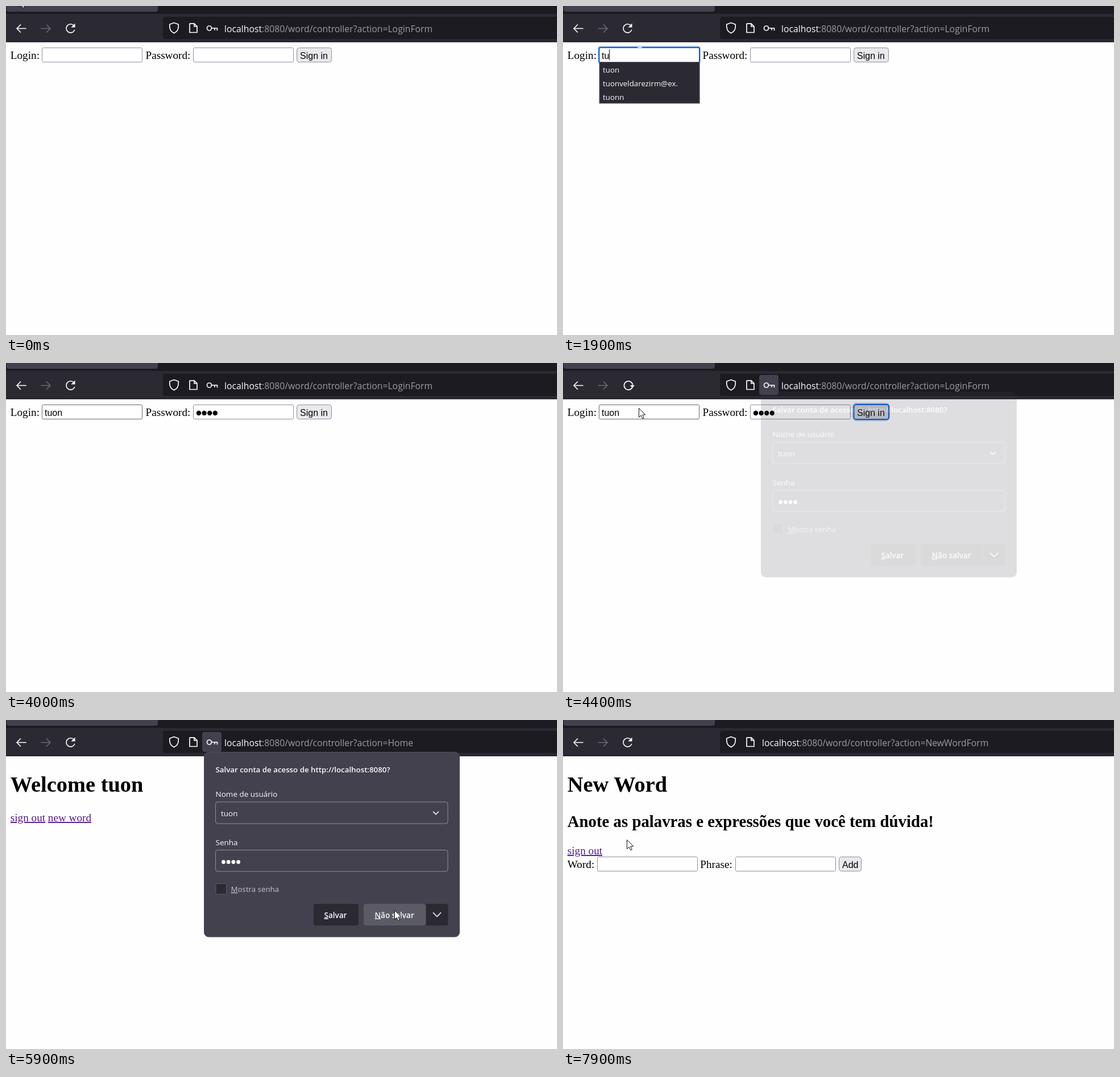
An HTML page for the animation above (8000 ms loop, 969 by 578 pixels).

```html
<!DOCTYPE html>
<html lang="pt">
<head>
<meta charset="utf-8">
<title>Word notes login</title>
<style>
html, body { margin: 0; width: 100%; height: 100%; overflow: hidden; background: #fefefe; }
svg { display: block; width: 969px; height: 578px; }
text { white-space: pre; }
.ui { font-family: "Open Sans", "Noto Sans", sans-serif; font-size: 13.5px; fill: #fbfbfe; }
.semi { font-weight: 600; }
.url { font-size: 15.78px; fill: #9c9ba3; }
.serif { font-family: "Liberation Serif", serif; font-size: 19.2px; }
.h1 { font-size: 38.4px; font-weight: bold; }
.h2 { font-size: 28.8px; font-weight: bold; }
.form { font-family: "Liberation Sans", sans-serif; font-size: 16px; }
.link { fill: #551a8b; text-decoration: underline; }
.active { fill: #ee0000; }
.key { text-decoration: underline; }
.icon { fill: none; stroke: #fbfbfe; stroke-width: 1.7; stroke-linecap: round; stroke-linejoin: round; }
</style>
</head>
<body>
<svg id="stage" viewBox="0 0 969 578"></svg>
<script>
const LOOP = 8000, STEP = 100;
const USER = "tuon";
const SUGGESTIONS = [USER, "00000000000", "tuonveldarezirm@ex.", "000.000.000-00", "tebo", "tuonn"];
const CARETS = [0, 4.4, 13.3, 22.2, 31.1];

// Pointer keys: time, x, y, shape
const POINTER = [
  [0, 23, -15, "arrow"], [200, 23, -15, "arrow"], [300, 70, 22, "arrow"], [400, 118, 62, "arrow"],
  [500, 135, 72, "beam"], [3000, 0, 0, "none"], [4400, 133, 79, "arrow"], [4700, 133, 79, "arrow"],
  [5000, 260, 132, "arrow"], [5300, 540, 262, "arrow"], [5600, 683, 318, "arrow"],
  [5700, 683, 338, "arrow"], [5800, 683, 338, "arrow"], [5900, 683, 334, "arrow"],
  [6300, 683, 334, "arrow"], [6400, 640, 300, "arrow"], [6600, 300, 165, "arrow"],
  [6700, 150, 142, "arrow"], [6800, 96, 150, "arrow"], [6900, 104, 175, "hand"],
  [7400, 104, 175, "arrow"], [7700, 104, 175, "arrow"], [7900, 112, 210, "arrow"]
];

const SHAPES = {
  none: "",
  arrow: `<path d="M.5.5V16.5L4.2 13 6.8 18.6 9.3 17.5 6.8 12H11.8Z" fill="#fff" stroke="#111"/>`,
  beam: `<path d="M-4 .5H4M0 0V17M-4 17.5H4" stroke="#fff" stroke-width="1.4" fill="none"/>`,
  hand: `<path d="M-3 1Q-1.5-.8 0 1V8Q2 6.5 3.2 8.3 5 7 6.2 9 8.8 8.4 8.8 11V15Q8.8 18 6.5 21H-1.5Q-3 17-7.2 13.5-7.5 11-5 12L-3 13.8Z" fill="#fff" stroke="#111" stroke-width="1.2"/><path d="M0 8V12M3.2 9V12M6.2 10V12" stroke="#111" fill="none"/>`
};

const rect = (x, y, w, h, fill, r = 0, stroke = "none", width = 1) =>
  `<rect x="${x}" y="${y}" width="${w}" height="${h}" rx="${r}" fill="${fill}" stroke="${stroke}" stroke-width="${width}"/>`;
const text = (x, y, cls, value, extra = "") => `<text x="${x}" y="${y}" class="${cls}" ${extra}>${value}</text>`;
const icon = (d, extra = "") => `<path class="icon" d="${d}" ${extra}/>`;
const dots = (n, x, y, pitch, r, fill) =>
  Array.from({ length: n }, (_, i) => `<circle cx="${x + i * pitch}" cy="${y}" r="${r}" fill="${fill}"/>`).join("");
const caret = x => rect(x, 76, 1, 19, "#000");
const chevron = (x, y, w) => icon(`M${x - w} ${y - w / 2}L${x} ${y + w / 2}L${x + w} ${y - w / 2}`, 'stroke-width="1.5"');
const accessKey = s => `<tspan class="key">${s[0]}</tspan>${s.slice(1)}`;
const between = (t, a, b) => t >= a && t < b;

function box(x, y, w, fill, radius, focused, border = "#8f8f9d") {
  if (!focused) return rect(x + .5, y + .5, w - 1, 25, fill, radius, border);
  return rect(x - 1, y - 2, w + 2, 30, "none", radius + 2, "#a9c9f5", 2) +
    rect(x + .5, y, w - .5, 26, fill, radius, "#0a5bd3", 2);
}
const field = (x, y, focused, border) => box(x, y, 177, "#fff", 2, focused, border);
const button = (x, y, w, label, focused, fill = "#e9e9ed") =>
  box(x, y, w, fill, 4, focused) + text(x + 6, y + 20, "form", label);

function toolbar(t) {
  const path = t < 4500 ? "LoginForm" : t < 7300 ? "Home" : "NewWordForm";
  const keyShown = t < 6200, loading = between(t, 4400, 4500);
  return rect(0, 0, 969, 14, "#1c1b22") + rect(1, -8, 266, 18, "#42414d", 4) +
    rect(0, 14, 969, 49, "#2b2a33") + rect(0, 62, 969, 1.6, "#0e0e12") +
    rect(276, 19, 700, 39, "#1c1b22", 4) +
    icon("M35 39.5H19M25.5 33L19 39.5L25.5 46") +
    icon("M62 39.5H78M71.5 33L78 39.5L71.5 46", 'style="stroke:#6a6973"') +
    (loading
      ? icon("M121.5 43.5A7.6 7.6 0 1 1 122.5 38") + `<path d="M118 39H126L122 44Z" fill="#fbfbfe"/>`
      : icon("M120.5 42.5A7.6 7.6 0 1 1 119 34") + `<path d="M121.5 30.5V37.5H114.5Z" fill="#fbfbfe"/>`) +
    icon("M295.5 29.5L303.2 32.3V36.5Q303 44 295.5 47.8Q288 44 287.8 36.5V32.3Z") +
    icon("M324 30.8H331L336 35.8V46.5H323V31.5ZM331 31V36H336") +
    (between(t, 4400, 6200) ? rect(345, 21, 34, 35, "#42414d", 4) : "") +
    (keyShown ? `<circle class="icon" cx="357.5" cy="39" r="4"/>` + icon("M361.5 39H371.5V42.5M367 39V42") : "") +
    text(keyShown ? 384 : 350, 46, "ui url",
      `<tspan fill="#fbfbfe">localhost</tspan>:8080/word/controller?action=${path}`);
}

function dropdown(typed) {
  const rows = SUGGESTIONS.filter(s => s.startsWith(typed));
  const h = rows.length * 24 + 1, bar = rows.length === 6;
  return rect(64, 98, 176.5, h, "#2b2a33") +
    rows.map((s, i) => text(70, 116.5 + i * 24, "ui", s, 'style="font-size:13.35px"')).join("") +
    (bar ? rect(219, 98, 21, h, "#23222b") + rect(219, 119, 21, 85, "#7c7b82") +
      icon("M225 111L229.5 106.5L234 111M225 230.5L229.5 235L234 230.5", 'style="stroke:#77767e"') : "") +
    rect(64, 98.5, 176, h - .5, "none", 0, "#66656f");
}

function loginPage(t) {
  const typed = USER.slice(0, Math.max(0, Math.min(4, Math.floor((t - 1700) / STEP))));
  const hidden = [3100, 3300, 3500, 3800].filter(k => t >= k).length;
  const onLogin = between(t, 1200, 2400), onPassword = between(t, 2400, 4000), onButton = t >= 4100;
  return text(7.8, 93, "serif", "Login:") + field(63, 73, onLogin, t >= 500 ? "#676774" : "#8f8f9d") +
    text(68, 93, "form", typed) +
    text(245.5, 93, "serif", "Password:") + field(329, 73, onPassword) +
    dots(hidden, 339, 88, 9.6, 4.2, "#000") +
    button(511, 73, 62, "Sign in", onButton, t >= 4400 ? "#d0d0d7" : "#e9e9ed") +
    (between(t, 1200, 1600) || between(t, 1800, 2300) ? caret(68 + CARETS[typed.length]) : "") +
    (between(t, 2500, 3000) ? caret(334) : "") +
    (between(t, 1200, 2300) ? dropdown(typed) : "");
}

const homePage = t => text(7.8, 126, "serif h1", "Welcome " + USER) +
  text(7.8, 178, "serif link", "sign out") +
  text(73.8, 178, "serif link" + (t >= 7100 ? " active" : ""), "new word");

const wordPage = () => text(7.8, 126, "serif h1", "New Word") +
  text(7.8, 188, "serif h2", "Anote as palavras e expressões que você tem dúvida!") +
  text(7.8, 236, "serif link", "sign out") +
  text(7.8, 260, "serif", "Word:") + field(60, 240) +
  text(241.3, 260, "serif", "Phrase:") + field(303, 240) + button(485, 240, 40, "Add");

function popup(t) {
  if (!between(t, 4400, 6200)) return "";
  const p = Math.min(1, (t - 4400) / 200), alpha = .165 + .835 * p, lift = -5 * (1 - p);
  const dark = "#2b2a33", line = "#8f8f9d";
  return `<g opacity="${alpha}" transform="translate(0 ${lift})">` +
    rect(348.5, 56.5, 449, 324.5, "#42414d", 8, "#4d4c58") +
    text(368.5, 91.5, "ui semi", "Salvar conta de acesso de http://localhost:8080?", 'style="font-size:13.3px"') +
    text(368.5, 135, "ui", "Nome de usuário") + rect(368.5, 144, 408.5, 38, "#42414d", 4, line) +
    text(378, 168.5, "ui", USER) + chevron(756, 163.5, 4.5) +
    text(368.5, 219.5, "ui", "Senha") + rect(368.5, 228.5, 408.5, 37.5, "#42414d", 4, line) +
    dots(4, 382.5, 249.5, 8.7, 3.4, "#fbfbfe") +
    rect(369, 287.5, 18.5, 18.5, dark, 2, "#5b5b66") +
    text(395.5, 302, "ui", accessKey("Mostra senha"), 'style="font-size:13.3px;fill:#c4c4c9"') +
    rect(541, 323, 79, 38, dark, 4) + text(559.5, 347.5, "ui semi", accessKey("Salvar")) +
    rect(629, 323, 148.5, 38, dark, 4) +
    (t >= 5700 ? rect(629, 323, 109, 38, "#5b5b66", 4) : "") + rect(738, 323, 1, 38, "#42414d") +
    text(648.5, 347.5, "ui semi", accessKey("Não salvar")) + chevron(758, 342, 6.5) + "</g>";
}

function pointer(t) {
  const i = POINTER.findLastIndex(k => k[0] <= t);
  const a = POINTER[i], b = POINTER[i + 1];
  const p = b && a[3] === "arrow" && b[3] !== "none" ? (t - a[0]) / (b[0] - a[0]) : 0;
  const at = n => p ? a[n] + (b[n] - a[n]) * p : a[n];
  return `<g transform="translate(${at(1)} ${at(2)})">${SHAPES[a[3]]}</g>`;
}

const stage = document.getElementById("stage");
const page = t => t < 4500 ? loginPage(t) : t < 7300 ? homePage(t) : wordPage();
let shown = -1;

function tick() {
  const t = Math.floor(performance.now() % LOOP / STEP) * STEP;
  if (t !== shown) {
    shown = t;
    stage.innerHTML = rect(0, 0, 969, 578, "#fefefe") + page(t) + toolbar(t) + popup(t) + pointer(t);
  }
  requestAnimationFrame(tick);
}
tick();
</script>
</body>
</html>
```
